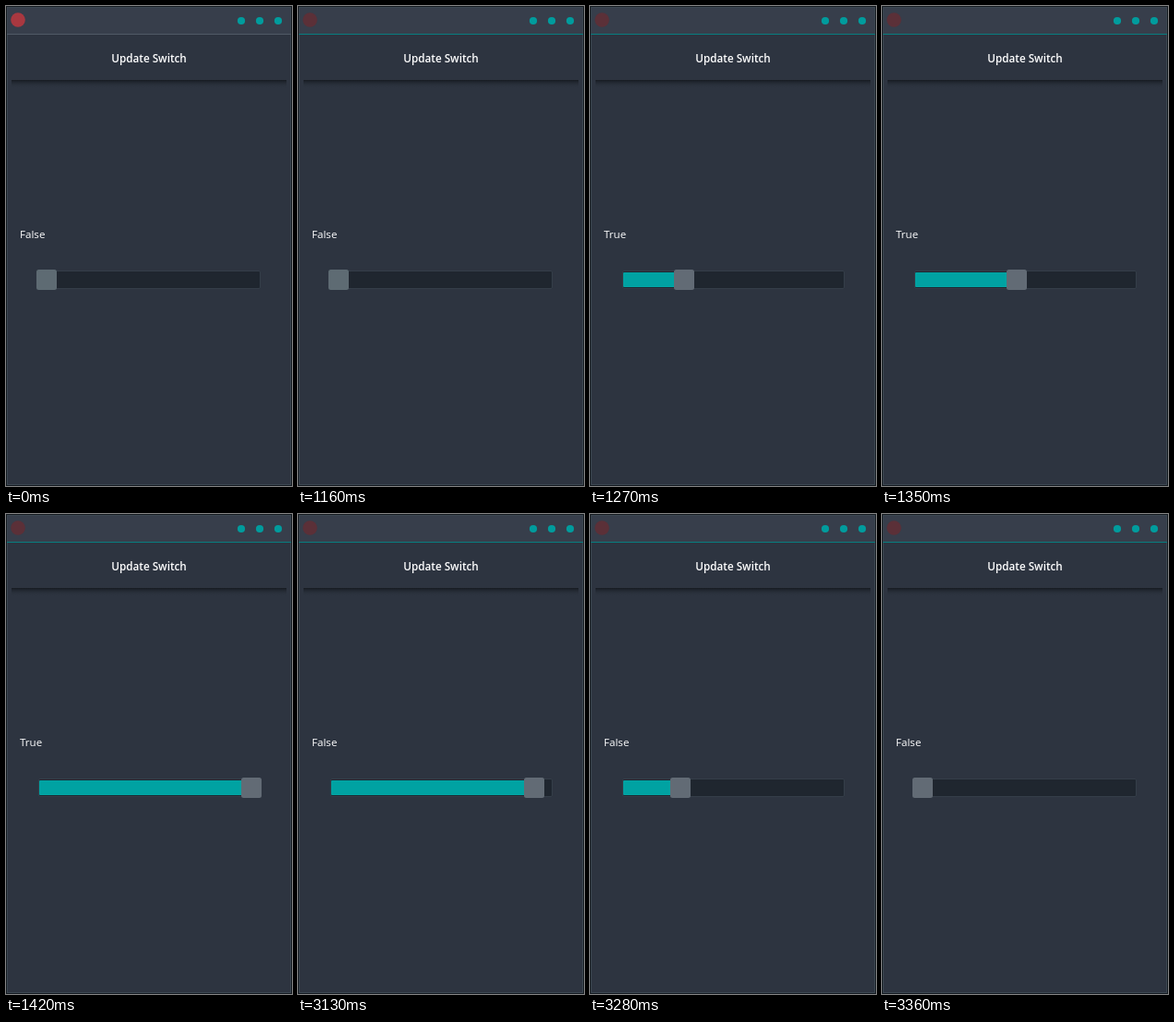
Animation of 310 by 519 pixels, one loop 3.93 s. Source, as an HTML page:

```html
<!DOCTYPE html>
<html lang="en">
<head>
<meta charset="utf-8">
<title>Update Switch</title>
<style>
  html, body { margin: 0; width: 100%; height: 100%; overflow: hidden; background: #2d3440; }
  svg { display: block; width: 310px; height: 519px; }
  text { font-family: "Open Sans", "Noto Sans", sans-serif; fill: #fff; }
</style>
</head>
<body>
<svg viewBox="0 0 310 519">
  <defs>
    <linearGradient id="shade" x2="0" y2="1">
      <stop offset="0" stop-color="#14181e" stop-opacity=".9"/>
      <stop offset=".45" stop-color="#1c222a" stop-opacity=".4"/>
      <stop offset="1" stop-color="#2d3440" stop-opacity="0"/>
    </linearGradient>
  </defs>

  <!-- Window -->
  <rect width="310" height="519" fill="#151b21"/>
  <rect x="1.5" y="1.5" width="307" height="516" fill="#2d3440" stroke="#3c4752"/>
  <rect x="2" y="2" width="306" height="28" fill="#373e4b"/>
  <rect id="rule" x="1" y="30" width="308" height="1"/>
  <circle id="badge" cx="13" cy="15" r="7.8"/>
  <g fill="#009c9d">
    <circle cx="255" cy="16" r="4.1"/>
    <circle cx="275" cy="16" r="4.1"/>
    <circle cx="295" cy="16" r="4.1"/>
  </g>

  <!-- Title panel -->
  <rect x="6" y="80" width="298" height="9" fill="url(#shade)"/>
  <text x="155" y="61" font-size="11.7" font-weight="600" text-anchor="middle">Update Switch</text>

  <!-- Switch -->
  <text id="label" x="15" y="251" font-size="11.6"></text>
  <rect x="35.5" y="286.5" width="240" height="19" rx="1.5" fill="#1f262f" stroke="#353e49"/>
  <rect id="fill" x="36" y="288" height="16" rx="1" fill="#00a2a2"/>
  <rect id="knob" y="285" width="22" height="22" rx="2.5"/>
</svg>
<script>
const LOOP = 3930;
const STEPS = [0, 1160, 1230, 1270, 1310, 1380, 1420,
               3130, 3170, 3210, 3280, 3320, 3360];
const LEFT = 33, TRAVEL = 222;
const [rule, badge, label, fill, knob] =
  ["rule", "badge", "label", "fill", "knob"].map(id => document.getElementById(id));

const ramp = (t, start, duration) => Math.min(1, Math.max(0, (t - start) / duration));

function draw(time) {
  // The picture only refreshes at these moments.
  const t = STEPS.filter(step => step <= time).pop();
  const active = t >= 1160;
  const on = t >= 1230 && t < 3130;
  const position = ramp(t, 1217, 203) - ramp(t, 3120, 212);
  const x = LEFT + Math.round(TRAVEL * position);

  rule.setAttribute("fill", active ? "#087d80" : "#505a66");
  badge.setAttribute("fill", active ? "#5b3038" : "#a93840");
  label.textContent = on ? "True" : "False";
  knob.setAttribute("x", x);
  knob.setAttribute("fill", t < 1230 ? "#5e6b73" : "#626b75");
  fill.setAttribute("width", position > 0 ? x - 25 : 0);
}

const origin = performance.now();
function tick() {
  draw((performance.now() - origin) % LOOP);
  requestAnimationFrame(tick);
}
draw(0);
requestAnimationFrame(tick);
</script>
</body>
</html>
```
